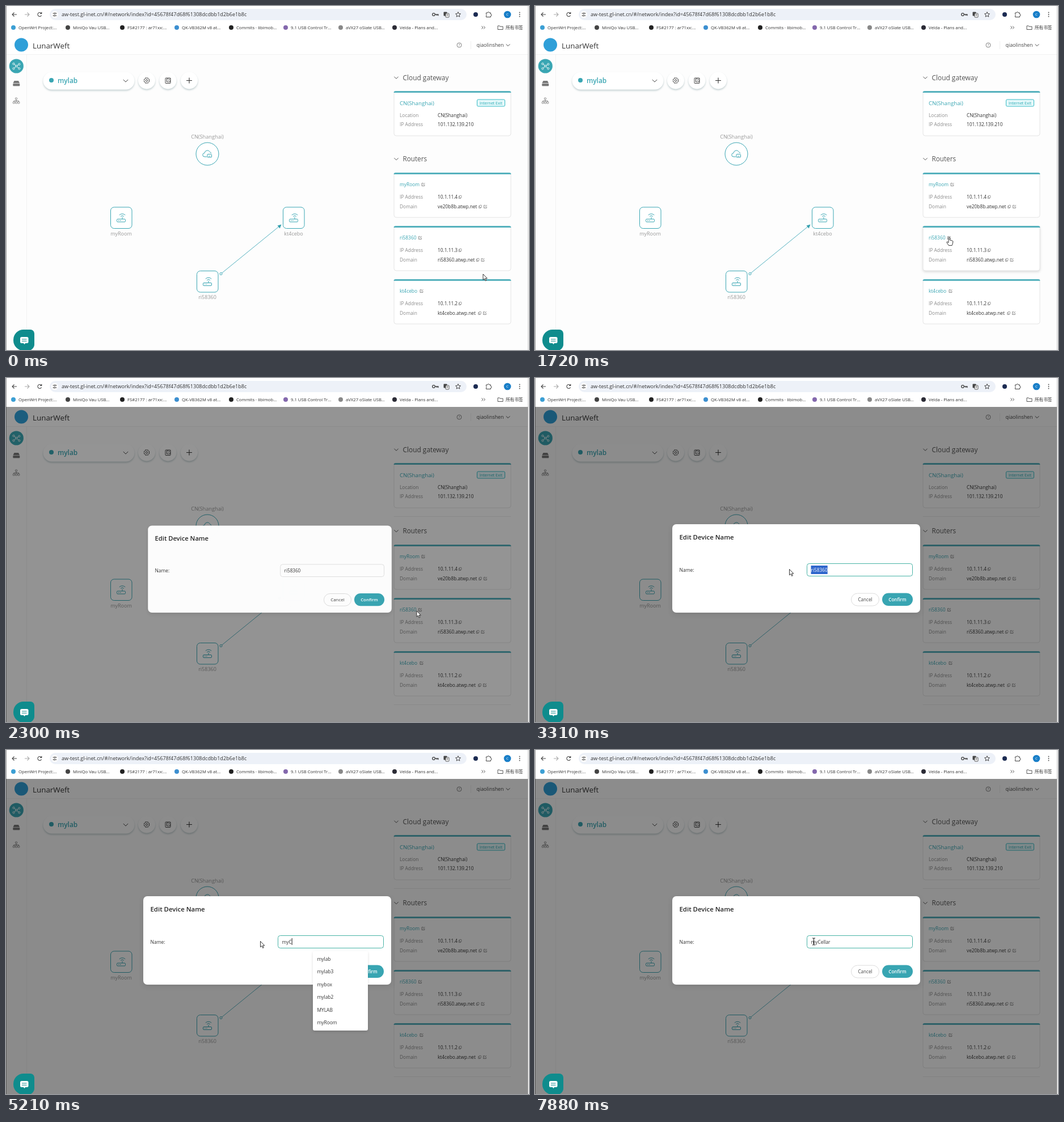
Write an HTML page that moves like this. It is 922 by 607 pixels and loops after 8 s.

```html
<!DOCTYPE html>
<html lang="en">
<head>
<meta charset="utf-8">
<title>Edit device name</title>
<style>
  html, body { margin: 0; width: 100%; height: 100%; overflow: hidden; background: #fff; }
  svg { display: block; width: 100vw; height: 100vh; }
  text { font-family: "Open Sans", "Noto Sans", "Noto Sans CJK SC", "Noto Sans CJK", sans-serif; white-space: pre; }
  .soft { filter: drop-shadow(0 2px 1.5px rgba(20, 70, 80, .24)); }
  .lift { filter: drop-shadow(0 2px 2px rgba(0, 0, 0, .13)); }
  .modal { filter: drop-shadow(0 3px 4px rgba(0, 0, 0, .1)); }
</style>
</head>
<body>
<svg id="stage" viewBox="0 0 922 607" preserveAspectRatio="none"></svg>
<script>
const LOOP = 8000;
const TEAL = '#3aa6b3', DARK = '#333', GREY = '#8c8c8c';
const OLD_NAME = 'ri58360', PEER = 'kt4cebo';

const text = (x, y, s, size, fill = DARK, more = '') =>
  `<text x="${x}" y="${y}" font-size="${size}" fill="${fill}" ${more}>${s}</text>`;
const rect = (x, y, w, h, r, fill, more = '') =>
  `<rect x="${x}" y="${y}" width="${w}" height="${h}" rx="${r}" fill="${fill}" ${more}/>`;
const circle = (x, y, r, fill, more = '') =>
  `<circle cx="${x}" cy="${y}" r="${r}" fill="${fill}" ${more}/>`;
const line = (d, stroke = DARK, width = 1, more = '') =>
  `<path d="${d}" fill="none" stroke="${stroke}" stroke-width="${width}" ${more}/>`;
const at = (x, y, body) => `<g transform="translate(${x} ${y})">${body}</g>`;
const border = (color, width = 1) => `stroke="${color}" stroke-width="${width}"`;
const MIDDLE = 'text-anchor="middle"';

const chevron = (x, y, r, color) => line(`M${x - r} ${y - r / 2}l${r} ${r} ${r}-${r}`, color);
const editIcon = (x, y, k = 1, color = '#777') => at(x, y,
  `<g transform="scale(${k})">` + line('M.5-2.3H-2.5V2.5H2.3V-.3M-.8.9L2.9-2.9', color, .8) + '</g>');
const copyIcon = (x, y) => at(x, y,
  rect(-1, -2.6, 3.4, 4, .6, 'none', border('#777', .7)) + line('M-1-1.2H-2.3V2.6H1V1.4', '#777', .7));

function toolbar() {
  const marks = [
    [13, '#3c9fd4', 'OpenWrt Project:...'], [109, '#444', 'MiniQo Vau USB...'],
    [205, '#222', 'FS#2177 : ar71xx:...'], [301, '#3c8fd0', 'QK-VB362M v8 at...'],
    [397, '#222', 'Commits · libimob...'], [493, '#8468ad', '9.1 USB Control Tr...'],
    [590, '#888', 'aVX27 oSlate USB...'], [685, '#2b2b35', 'Velda - Plans and...']
  ];
  return rect(0, 0, 922, 51, 0, '#fff') + rect(77, 5, 735, 20, 10, '#edf1f8') +
    line('M19 15H11M14.5 11.5L11 15l3.5 3.5', '#444', 1.1) +
    line('M33 15H41M37.5 11.5L41 15l-3.5 3.5', '#aaa', 1.1) +
    line('M62.3 12.9A3.5 3.5 0 1 0 62.6 16.5M62.8 10.8V13.4H60', '#444', 1.1) +
    circle(86, 15, 6, '#fff') +
    line('M82.5 13H85M87.8 13H89.5M82.5 17H84M87 17H89.5', '#444') +
    circle(86.3, 13, 1.2, 'none', border('#444', .9)) + circle(85.5, 17, 1.2, 'none', border('#444', .9)) +
    text(98, 18.2, 'aw-test.gl-inet.cn/#/network/index?id=45678f47d68f61308dcdbb1d2b6e1b8c', 9.1) +
    circle(754, 15, 2.3, 'none', border('#444', 1.3)) + line('M756 15H762V17.3M759.6 15V17', '#444', 1.3) +
    rect(771.5, 10.5, 6, 7, 1, '#444') + rect(775, 13, 6, 7, 1, '#fff', border('#444', .9)) +
    line('M776.5 15.5H779.5M778 14.5V18.3', '#444', .7) +
    line('M797 10.5l1.3 3 3.2.3-2.4 2.1.7 3.2-2.8-1.7-2.8 1.7.7-3.2-2.4-2.1 3.2-.3Z', '#444') +
    circle(828, 15, 4, '#1c2b52') +
    line('M846.5 12H849a1.5 1.5 0 0 1 3 0H854.5V14.5a1.5 1.5 0 0 1 0 3V19.5H846.5V17a1.5 1.5 0 0 0 0-2.5Z', '#444') +
    circle(884, 15, 6.3, '#1a7fc8') + text(884, 17.2, 'C', 6, '#fff', MIDDLE) +
    [11.5, 15, 18.5].map(y => circle(905.5, y, .9, '#444')).join('') +
    marks.map(([x, color, name]) => circle(x, 38, 4, color) + text(x + 9, 41, name, 7.7)).join('') +
    line('M838.5 35.5l2.5 2.5-2.5 2.5M842 35.5l2.5 2.5-2.5 2.5', '#444', .9) +
    line('M867 41.5V35H870l1 1.2H876V41.5Z', '#444', .9) + text(881, 41, '所有书签', 7.6);
}

function card(y, body, id = '') {
  return `<g ${id}>` + rect(684, y, 206, 78, 4, '#fff', border('#e4e4e4')) +
    `<path d="M683.5 ${y + 2}a3.5 3 0 0 1 3.5-3H887a3.5 3 0 0 1 3.5 3Z" fill="#55b1bd"/></g>` + body;
}
const row = (y, label, value) => text(694, y, label, 8.4, GREY) + text(761, y, value, 8.3);

function routerCard(y, name, ip, host, nameEnd, hostEnd, id) {
  return card(y, text(694, y + 23, name, 8.4, TEAL) + editIcon(nameEnd, y + 20) +
    row(y + 45, 'IP Address', ip) + copyIcon(800.5, y + 42) +
    row(y + 61.5, 'Domain', host + '.atwp.net') + copyIcon(hostEnd, y + 59) + editIcon(hostEnd + 9, y + 59), id);
}

function node(x, y, name) {
  return at(x, y, rect(-18.5, -18.5, 37.5, 37.5, 6, '#fff', border(TEAL)) +
    rect(-7.5, 2.5, 15, 5, 1.5, 'none', border(TEAL)) +
    line('M-5 5H-3.5M-2 5H-.5M2 2.5V-1M-.8-2.2a4 4 0 0 1 5.6 0M-3.2-4.6a7.4 7.4 0 0 1 10.4 0', TEAL) +
    text(0, 31.3, name, 9, '#999', MIDDLE));
}

function page() {
  const button = x => circle(x, 131.5, 15, '#fff', 'class="soft"');
  return rect(0, 51, 922, 556, 0, '#fdfdfd') + rect(0, 51, 922, 34, 0, '#fff') +
    line('M0 85.5H921M36.5 86V607', '#f1f1f1') +
    circle(27, 68.5, 12, '#2f9fd8') + text(47, 74.5, 'LunarWeft', 13.4, DARK, 'font-weight="500"') +
    circle(799, 69, 4, 'none', border('#666', .8)) + text(799, 71.3, '?', 6, '#555', MIDDLE) +
    line('M819.5 62V76', '#f0f0f0') + text(829.5, 72, 'qiaolinshen', 8.9, '#444') + chevron(885, 69, 3.3, '#444') +
    circle(18.3, 106, 12.6, TEAL) +
    line('M14 102L18 106l5-3M18 106l-4 4M18 106l5 4', '#fff', .9) +
    [[13.5, 102], [23.3, 102.7], [13.5, 110.3], [23.3, 110.3], [18.3, 106]]
      .map(([x, y]) => circle(x, y, 1.6, TEAL, border('#fff', .9))).join('') +
    '<path d="M12.5 136l2-4H22l2 4Z" fill="#777"/>' + rect(12.3, 136.8, 12, 4.4, 1, '#777') +
    line('M18 165V168M13.8 169V167.5H22.5V169', '#777', .9) +
    [[16.5, 162], [12.3, 169], [16.5, 169], [20.8, 169]]
      .map(([x, y]) => rect(x, y, 3, 3, .5, '#fff', border('#777', .8))).join('') +
    rect(65.5, 116.5, 161, 31, 15.5, '#fff', 'class="soft"') + circle(80, 131, 4, TEAL) +
    text(91, 136, 'mylab', 11.8, TEAL, 'font-weight="600"') + chevron(211, 132, 4.2, '#444') +
    button(248) + circle(248, 131.5, 4.6, 'none', border('#444', 1.2) + ' stroke-dasharray="2.8 .8"') +
    circle(248, 131.5, 1.8, 'none', border('#444')) +
    button(285.5) + rect(281, 127, 9, 9.5, 1, 'none', border('#444')) + editIcon(286.5, 131, 1.2, '#444') +
    button(323) + line('M318 131.5H328M323 126.5V136.5', '#333', 1.1) +
    text(355, 233.5, 'CN(Shanghai)', 9.2, '#999', MIDDLE) +
    circle(355, 261, 20, '#fff', border(TEAL)) +
    line('M354 266H350a3 3 0 0 1 0-6.5 5 5 0 0 1 9.5-1.7 3 3 0 0 1 2.2 2.2', TEAL) +
    rect(355, 261.5, 7.5, 5.5, 1, '#fff', border(TEAL)) + line('M357 265H360.5', TEAL, .8) +
    line('M379 472.5L482 388.5', '#55b1bf') + '<path d="M485.5 385.5l-7 2 4.3 5Z" fill="#35a0ae"/>' +
    circle(379, 472.5, 2, '#fff', border(TEAL)) +
    node(203, 373.5, 'myRoom') + node(507, 373.5, PEER) + node(355, 486, OLD_NAME) +
    chevron(688, 126.5, 3.6, '#555') + text(699.5, 131, 'Cloud gateway', 11.9, '#555') +
    card(151, text(694, 174.5, 'CN(Shanghai)', 9.7, TEAL) +
      rect(830.5, 165, 49, 12, 2, '#e4f8fa', border('#36bcc6')) +
      text(855, 173.7, 'Internet Exit', 7, '#27aab4', MIDDLE) +
      row(195.5, 'Location', 'CN(Shanghai)') + row(212, 'IP Address', '101.132.139.210')) +
    chevron(688, 270, 3.6, '#555') + text(699.5, 274.3, 'Routers', 11.7, '#555') +
    routerCard(295, 'myRoom', '10.1.11.4', 've20b8b', 735.5, 836) +
    routerCard(389, OLD_NAME, '10.1.11.3', OLD_NAME, 730, 831.5, 'id="hoverCard"') +
    routerCard(483, PEER, '10.1.11.2', PEER, 732.5, 835) +
    line('M684 244.5H890M684 576.5H890', 'rgba(0,0,0,.07)', 1, 'id="dividers"');
}

const dialog = () => rect(242, 258, 437, 156, 7, '#fff', 'id="panel" class="modal"') +
  text(254.5, 285, 'Edit Device Name', 11.4, '#222', 'font-weight="600"') +
  text(254.5, 341.5, 'Name:', 8.5) +
  rect(479.5, 327.5, 186, 22, 4, '#fff', 'id="field"') +
  '<g id="fieldBack"></g>' + text(486.5, 341.5, '', 8.3, DARK, 'id="value"') + '<g id="caret"></g>' +
  rect(557.5, 380, 49, 22, 11, 'none', border('#dcdcdc')) + text(582, 394, 'Cancel', 8.1, '#444', MIDDLE) +
  rect(612, 379.5, 54, 22.5, 11.2, '#38a5b2') + text(639, 394, 'Confirm', 8, '#fff', MIDDLE + ' font-weight="600"');

const chat = '<path d="M31 571H43a7 7 0 0 1 7 7V597a11 11 0 0 1-11 11H31a18 18 0 0 1-18-18V589a18 18 0 0 1 18-18Z" fill="#0f8c8d"/>' +
  rect(25, 584, 14.5, 11, 2.5, '#fff') + '<path d="M30 594h5l-2.5 3Z" fill="#fff"/>' +
  line('M28 588H36.5M28 591.3H36.5', '#0f8c8d', 1.1);

const pointers = {
  arrow: '<path d="M0 0V10.3L2.4 8.1 4.2 12 5.8 11.2 4.1 7.6H7.3Z" fill="#fff" stroke="#222" stroke-width=".9"/>',
  hand: '<path d="M-1 1a1.1 1.1 0 0 1 2.2 0V5l4.5 1.2q1.3.4 1.2 1.8L6 12.2 5 14.6H-.6L-4 9.6q-.7-1.3.6-1.6L-1 9.5Z" fill="#fff" stroke="#222" stroke-width=".9"/>',
  beam: line('M-2.5 0H-1L0 .8 1 0H2.5M0 .8V11.2M-2.5 12H-1L0 11.2 1 12H2.5', '#222', 1.1)
};

// Tracks: each entry holds from its time until the next one.
const pointerTrack = [
  [0, 841, 473, 'arrow'], [150, 818, 461, 'arrow'], [295, 770, 438, 'arrow'], [440, 710, 418, 'arrow'],
  [585, 666, 409, 'arrow'], [730, 652, 405, 'arrow'], [870, 660, 403, 'arrow'], [1015, 680, 402, 'arrow'],
  [1160, 693, 401, 'arrow'], [1300, 702, 403, 'beam'], [1440, 714, 404, 'beam'], [1580, 727, 407, 'hand'],
  [1720, 730, 408, 'hand'], [2150, 728, 408, 'arrow'], [2300, 724, 411, 'arrow'], [2440, 690, 395, 'arrow'],
  [2580, 610, 362, 'arrow'], [2720, 540, 334, 'beam'], [2865, 519, 332, 'beam'], [3005, 514, 332, 'beam'],
  [3150, 505, 332, 'beam'], [3310, 448.5, 337.5, 'arrow'], [7730, 472, 337, 'arrow'], [7880, 491.5, 332, 'beam']
];
// time, shade, scale, opacity, panel colour
const modalTrack = [
  [0, 0, 0, 0, '#fff'], [2150, .07, .7, .72, '#ececec'], [2300, .42, .983, .98, '#fff'], [2440, .45, 1, 1, '#fff']
];
// time, value, caret shown, selection start
const valueTrack = [
  [0, OLD_NAME, 0], [2865, OLD_NAME, 1], [3005, OLD_NAME, 0, 6], [3150, OLD_NAME, 0, 5], [3310, OLD_NAME, 0, 0],
  [4200, 'm', 1], [4500, 'my', 1], [4930, 'my', 0], [5210, 'myC', 1], [5760, 'myC', 0], [6340, 'myC', 1],
  [6620, 'myCe', 1], [6755, 'myCel', 1], [6885, 'myCell', 1], [7020, 'myCella', 1], [7300, 'myCellar', 1],
  [7730, 'myCellar', 0]
];
const typedM = ['mylab', 'mylab3', 'mylab2', 'mybox', 'myRoom', 'MYLAB'];
const typedMy = ['mylab', 'mylab3', 'mybox', 'mylab2', 'MYLAB', 'myRoom'];
const listTrack = [[0, 0, typedM], [4200, 1, typedM], [4500, 1, typedMy], [5345, .5, typedMy], [5480, 0, typedMy]];

const now = (track, t) => track.findLast(key => key[0] <= t);
const stage = document.getElementById('stage');
stage.innerHTML = page() + line('M.5 51V607', '#a0a0a0') + rect(0, 51, 920, 556, 0, '#000', 'id="shade"') + chat +
  `<g id="dialog">${dialog()}</g><g id="list"></g>` + toolbar() + line('M.5 0V51', '#a0a0a0') +
  line('M920.5 0V607', '#c4c4c4') + line('M921.5 0V607', '#fff') + '<g id="pointer"></g>';
const el = Object.fromEntries([...stage.querySelectorAll('[id]')].map(e => [e.id, e]));
const set = (e, attrs) => Object.entries(attrs).forEach(([key, value]) => e.setAttribute(key, value));

function drawValue(t) {
  const [, value, caret, from] = now(valueTrack, t);
  const selected = from !== undefined;
  const cut = selected ? from : value.length;
  el.value.innerHTML = value.slice(0, cut) + `<tspan fill="#fff">${value.slice(cut)}</tspan>`;
  const edge = n => 486.5 + (n ? el.value.getSubStringLength(0, n) : 0);
  el.fieldBack.innerHTML = selected
    ? rect(edge(from), 331, edge(value.length) - edge(from), 15, 0, '#2f66cc') : '';
  el.caret.innerHTML = caret ? rect(edge(value.length), 332, 1, 12, 0, '#222') : '';
  set(el.field, { stroke: t >= 2865 ? '#48b3a6' : '#e0e0e0' });
}

function draw(t) {
  const [, x, y, kind] = now(pointerTrack, t);
  el.pointer.innerHTML = at(x, y, pointers[kind]);
  const hovered = t < 2150 && x > 684 && x < 890 && y > 389 && y < 467;
  set(el.hoverCard, { class: hovered ? 'lift' : '' });

  const [, shade, scale, opacity, color] = now(modalTrack, t);
  set(el.shade, { opacity: shade });
  set(el.dividers, { opacity: shade ? 1 : 0 });
  set(el.panel, { fill: color });
  set(el.field, { fill: color });
  set(el.dialog, {
    opacity, display: opacity ? 'inline' : 'none',
    transform: `translate(728 411) scale(${scale}) translate(-728 -411)`
  });
  if (opacity) drawValue(t);

  const [, visible, names] = now(listTrack, t);
  set(el.list, { opacity: visible });
  el.list.innerHTML = visible ? rect(541, 355, 97, 140, 3, '#fff', 'class="lift"') +
    names.map((name, i) => text(548.5, 372 + i * 22.4, name, 8.4)).join('') : '';
}

const start = performance.now();
function tick() {
  draw((performance.now() - start) % LOOP);
  requestAnimationFrame(tick);
}
tick();
</script>
</body>
</html>
```
